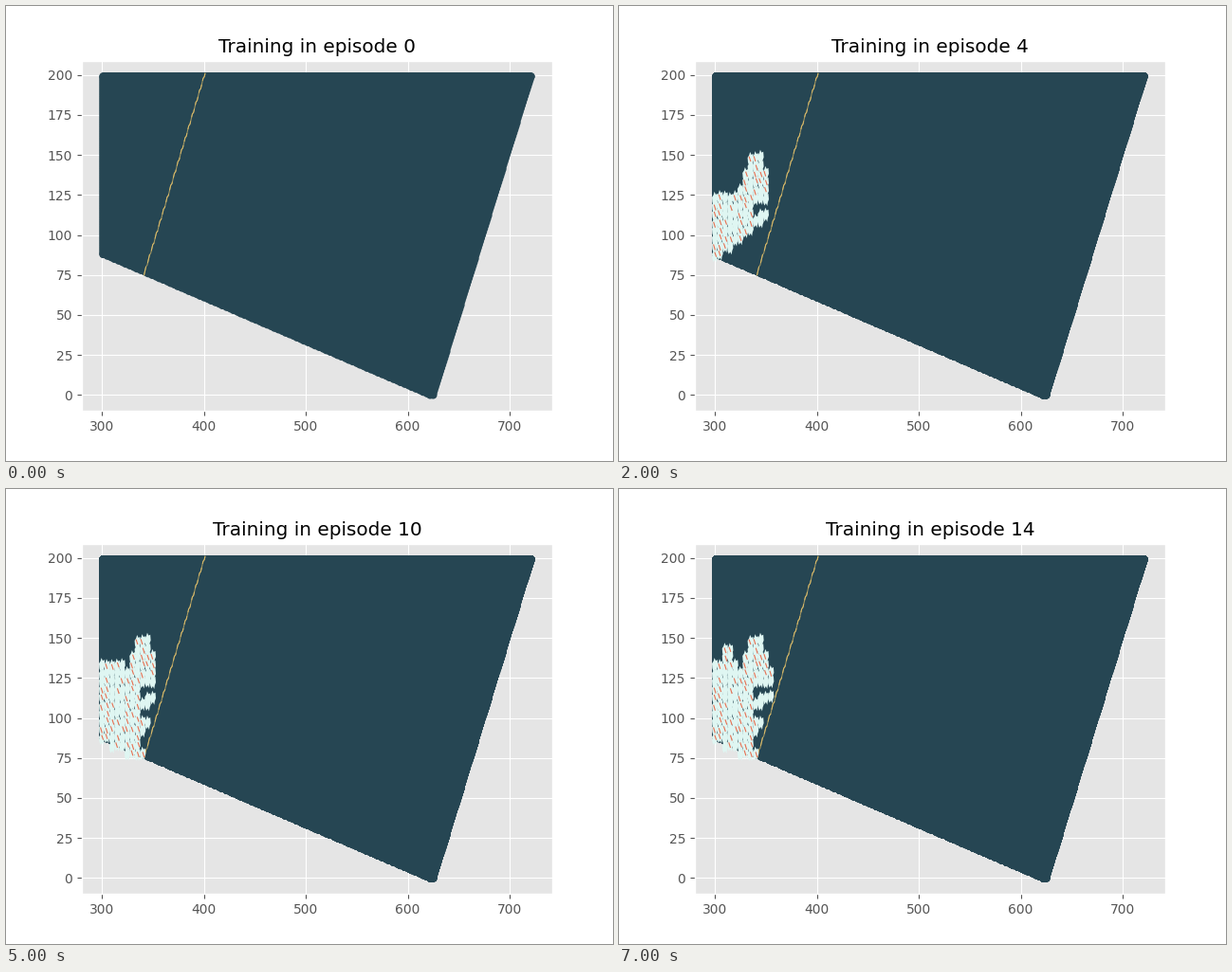
Animation, 640 px wide and 480 px high, one loop 8000 ms. Source, as a matplotlib script:

```python
import numpy as np
import matplotlib.pyplot as plt
from matplotlib.animation import FuncAnimation
from matplotlib.collections import LineCollection, PolyCollection
from matplotlib.transforms import Affine2D

W, H = 640, 480
DARK, GOLD, PALE, CORAL = "#264653", "#e9c46a", "#dff6f2", "#e76f51"
CELL_W, CELL_H, COLS, ROWS = 5.37, 8.45, 12, 15

# Upward forays: first episode, centre column, top row, half width
PEAKS = [(2, 3, 5, 4), (2, 7, 4, 1), (4, 8, 0, 1), (10, 2, 3, 2),
         (12, 2.5, 1, 0.5)]

plt.style.use("ggplot")
fig, ax = plt.subplots(figsize=(W / 100, H / 100), dpi=100)
ax.set(xlim=(280, 742), ylim=(-9.95, 208.95),
       xticks=range(300, 701, 100), yticks=range(0, 201, 25))
title = ax.set_title("")

# Stage pixels, origin at the top left
stage = Affine2D().scale(1 / W, -1 / H).translate(0, 1) + fig.transFigure


def field_edge():
    """Integer grid points along the border of the field."""
    left = [(301, y) for y in range(88, 200)]
    top = [(x, 199) for x in range(301, 722)]
    right = [(int(625 + y * 96 / 199), y) for y in range(199, -1, -1)]
    low = [(x, int(np.ceil(88 * (622 - x) / 321))) for x in range(622, 300, -1)]
    return np.array(left + top + right + low, float)


edge = field_edge()
ax.fill(edge[:, 0], edge[:, 1], color=DARK, lw=0, zorder=1)
rim = ax.scatter(edge[:, 0], edge[:, 1], s=36, linewidths=0, zorder=1)
rim.set_facecolor([DARK, DARK])  # a colour list keeps dots off the pixel grid


def barrier_x(y):
    return 145.3 + 64.5 * (284 - y) / 213


# Thin ragged barrier
bar_y = np.linspace(284, 71, 120)
bar_x = barrier_x(bar_y) + 0.9 * ((bar_y / 12.5) % 1 - 0.5)
for alpha, dash in ((0.65, "-"), (0.8, (0, (9, 4)))):
    ax.plot(bar_x, bar_y, color=GOLD, lw=0.75, alpha=alpha, ls=dash,
            transform=stage, zorder=2)

noise = np.random.default_rng(4).random((COLS, ROWS, 4))
leaf = np.array([(0, 3), (1.6, 0.5), (2.6, -3), (4, 0), (5.8, -1), (6.3, 5),
                 (5.2, 8), (4.6, 12), (3.2, 9), (1.6, 11.5), (0.4, 8)])
marks = ax.add_collection(PolyCollection(
    [], facecolors=PALE, edgecolors="none", transform=stage, zorder=3),
    autolim=False)
flecks = ax.add_collection(LineCollection(
    [], colors=CORAL, linewidths=0.8, transform=stage, zorder=4),
    autolim=False)


def origin(col, row):
    shift = 3 * (noise[col, row, 0] - 0.5)
    return np.array([98 + CELL_W * col, 156 + CELL_H * row + shift])


def is_visited(col, row, episode):
    tops = [top + 2 * max(0, abs(col - mid) - half)
            for start, mid, top, half in PEAKS if start <= episode]
    reach = np.interp(episode, [2, 4, 12], [8, 10, 11])
    floor = 12.5 + col * np.interp(episode, [2, 4, 8], [-0.9, -0.5, 0.3])
    x, y = origin(col, row)
    inside = x + CELL_W < barrier_x(y + 5)
    patchy = col > 7 and row > 5 and noise[col, row, 1] < 0.4
    return (bool(tops) and min(tops) <= row <= floor and col <= reach
            and inside and not patchy)


def fleck(col, row):
    x, y = origin(col, row)
    a, b = noise[col, row, 2:]
    x += 1 + 2.5 * a
    return [(x, y + 1 + 2 * b), (x + 1.8, y + 6 + 3 * b)]


def draw(i):
    episode = 2 * i
    title.set_text(f"Training in episode {episode}")
    # Every episode repaints the field, which hardens its border
    rim.set_offsets(np.tile(edge, (episode + 1, 1)))
    cells = [c for c in np.ndindex(COLS, ROWS) if is_visited(*c, episode)]
    marks.set_verts([leaf + origin(*c) for c in cells])
    flecks.set_segments([fleck(*c) for c in cells if noise[c][1] < 0.65])
    return title, rim, marks, flecks


anim = FuncAnimation(fig, draw, frames=8, interval=1000, repeat=True,
                     repeat_delay=0, blit=False)
plt.show()
```
